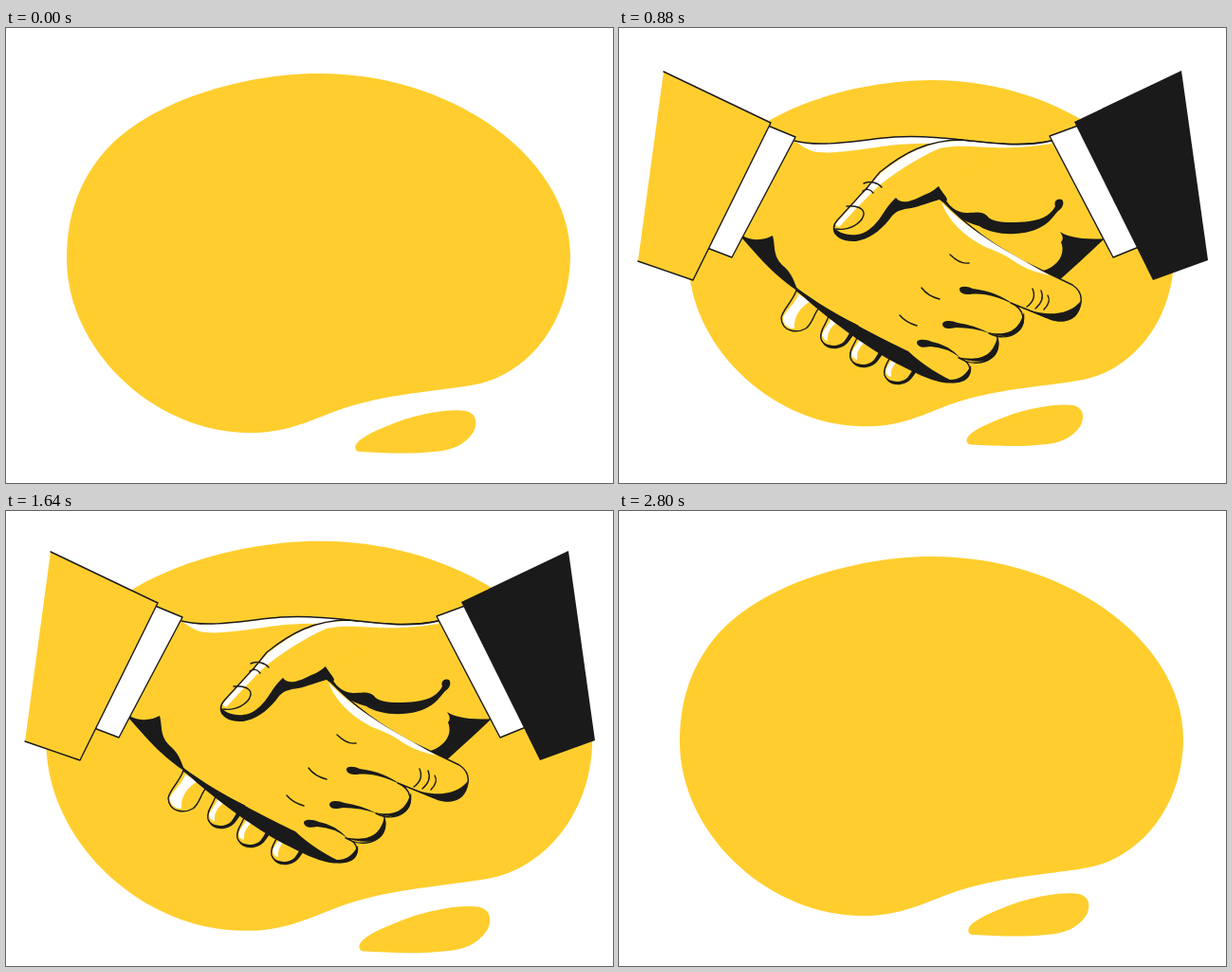
Recreate the animation shown at these times as an HTML page. Size 640x480 px, loop 2.88 s.

```html
<!DOCTYPE html>
<html lang="en">
<head>
<meta charset="utf-8">
<title>Handshake</title>
<style>
html, body { margin: 0; width: 100%; height: 100%; overflow: hidden; background: #fff; }
svg { display: block; width: 640px; height: 480px; }
.y { fill: #ffce2e; }
.k { fill: #1a1a1a; }
.w { fill: #fff; }
.l { fill: none; }
.l, .o { stroke: #1a1a1a; stroke-width: 1.4; stroke-linecap: round; stroke-linejoin: round; }
</style>
</head>
<body>
<svg viewBox="0 0 640 480">
  <defs>
    <path id="knuckles" class="l" d="M298 249C304 246 306 242 304 236M306 252C312 249 314 243 312 237M314 255C320 252 321 247 320 241"/>
    <g id="tip">
      <path class="k" d="M222 300C220 312 211 318 213 329C217 341 234 341 242 331C247 325 248 320 255 316Z"/>
      <path class="y o" d="M222 300C220 312 211 318 213 328C216 337 231 338 238 331C244 324 244 317 252 314Z"/>
      <path class="w" d="M224 303L233 308C224 314 219 321 220 330C215 329 213 324 215 321C219 314 223 311 224 303Z"/>
    </g>
  </defs>

  <g id="blob" class="y">
    <path d="M64 243C64 200 76 165 100 135C147 77 250 48 330 48C475 48 595 140 595 240C595 310 550 368 490 377C440 385 390 387 340 407C310 419 290 427 257 427C157 427 64 340 64 243Z"/>
    <path d="M369 445C364 435 390 424 420 413C450 404 472 402 485 404C497 407 497 418 493 426C484 440 470 446 450 447C425 450 395 448 373 447Q370 447 369 445Z"/>
  </g>

  <!-- right hand, behind the left one -->
  <g class="right">
    <g class="open" transform="translate(-74 33)">
      <path class="y o" d="M270 247L335 203L380 225L378 270L330 300Z"/>
      <path class="l" d="M314 273L363 238M318 279L366 246"/>
      <path class="k" d="M309 232C313 242 318 248 329 256L304 250Q310 246 309 232Z"/>
      <path class="w" d="M280 243L309 224L306 230L286 246ZM320 280L356 255L352 261L326 284Z"/>
      <path class="y" d="M355 99C385 89 410 84 440 86C470 88 500 97 528 90L584 191L516 249L430 290L380 262L333 204L410 137L350 130Z"/>
      <path class="l" d="M350 101C380 90 410 84 440 86C470 88 500 97 528 91"/>
      <path class="w" d="M524 97C500 99 470 89 440 87C410 85 375 94 350 103L352 110C385 97 410 92 440 94C475 101 500 104 524 97Z"/>
      <path class="k" d="M411 135L333 204C338 228 366 242 379 266L284 352C280 366 288 370 302 369C335 357 380 320 410 294C400 320 375 350 350 380C375 386 395 372 415 346L431 328C460 300 500 266 518 249L585 191C565 193 550 190 541 186C540 197 550 202 546 210C536 224 510 224 484 230C467 232 464 238 469 244C480 256 485 266 472 276C450 286 425 284 412 276C402 268 406 255 411 249C420 238 425 228 419 227C400 240 375 240 356 229C340 216 340 205 351 199C370 190 386 186 391 174C393 163 402 158 412 154Z"/>
      <path class="y o" d="M378 264C392 270 396 285 386 298C376 305 366 304 362 298C368 318 350 328 330 333C332 345 310 358 296 364C285 367 279 362 284 352C310 325 350 291 378 264Z"/>
      <path class="w" d="M284 353L293 348C290 355 291 360 294 363C286 365 281 360 284 353Z"/>
      <path class="y o" d="M408 294C418 300 424 308 423 317C417 327 408 331 399 325C406 334 400 343 392 346C386 347 384 344 381 340C386 355 372 370 360 380C350 383 345 376 346 366C365 342 385 318 408 294Z"/>
      <path class="l" d="M392 168C394 194 410 208 439 213"/>
      <path class="k" d="M411 134C417 150 427 160 440 163C450 165 457 162 463 170C470 177 505 177 520 172C532 168 537 160 534 154C535 148 542 148 543 152C543 158 540 162 536 166C528 182 515 190 495 190C475 190 465 180 450 178C432 172 418 162 408 146Z"/>
    </g>
    <g class="closed">
      <path class="y" d="M362 118C400 124 430 124 456 119L511 222L462 267L350 200L300 150Z"/>
      <path class="l" d="M350 117C400 124 430 124 456 119"/>
      <path class="k" d="M512 222C495 238 480 252 462 268L443 257C460 254 472 240 466 226Q470 222 465 215C472 220 490 224 512 222Z"/>
      <path class="y o" d="M187 277C182 290 172 298 171 306C172 321 188 322 197 317C205 311 205 301 212 294Z"/>
      <path class="w" d="M189 281L202 288C191 295 184 304 185 317C177 317 172 311 173 305C178 295 186 291 189 281Z"/>
      <use href="#tip"/>
      <use href="#tip" transform="translate(31 20)"/>
      <use href="#tip" transform="translate(67 38)"/>
      <path class="k" d="M340 172C347 190 357 195 368 195C378 195 382 193 388 198C392 206 415 206 432 204C448 202 456 196 460 188C458 182 463 179 467 181C470 184 468 190 463 193C457 200 452 207 443 211C425 220 395 219 380 209C362 204 348 195 340 182Z"/>
    </g>
  </g>

  <g id="left">
    <g class="open" transform="translate(132 40)">
      <path class="y" d="M54 79C80 86 110 83 140 77C185 71 225 72 250 83C270 95 275 99 286 102C296 106 306 104 311 112C316 122 312 135 300 140C285 143 258 136 240 126L191 127C215 150 240 168 270 188L370 250C380 257 381 270 374 275Q372 278 366 279C378 282 386 287 383 297Q380 307 358 308Q355 313 353 322Q350 333 325 334C322 350 310 354 245 342L215 334L62 246L-2 180Z"/>
      <path class="l" d="M300 140C285 143 258 136 240 126L191 127C215 150 240 168 270 188L370 250C380 257 381 270 374 275C368 279 360 278 350 275L290 254C262 245 250 240 230 237M300 140C312 135 316 122 311 112C306 104 296 106 286 102C270 95 262 86 250 83"/>
      <path class="w" d="M235 78Q252 83 263 92C278 99 295 106 308 109Q306 114 299 114C285 107 270 102 258 97Q245 87 232 83Z"/>
      <path class="l" d="M275 112C272 118 285 121 296 120C306 119 311 114 309 110M275 112C280 105 293 106 303 108M247 96C249 90 255 88 263 88M257 98C258 92 264 91 272 93"/>
      <path class="k" d="M227 237C227 233 235 232 243 236Q254 238 264 245Q251 240 239 240C231 242 227 240 227 237ZM209 268C209 264 217 264 225 267L246 274L222 271C214 273 209 271 209 268ZM181 293C181 288 190 289 197 292Q208 293 216 299Q206 295 195 296C186 298 182 296 181 293Z"/>
      <path class="k" d="M379 262C382 276 370 283 352 276C366 277 375 274 379 262ZM384 288C387 310 372 312 352 306C370 306 377 304 384 288ZM352 313C359 332 342 338 322 333C341 332 348 328 352 313ZM322 336C326 352 306 356 282 350C306 350 317 348 322 336Z"/>
      <path class="l" d="M220 268C255 272 300 290 358 306M366 279C378 282 386 287 383 297C380 307 368 308 358 306M192 293C225 298 270 320 325 333M350 308C356 314 353 328 345 332Q338 335 325 333M318 333C325 338 322 348 312 351C298 353 270 348 225 336"/>
      <path class="l" d="M356 273C357 262 361 256 370 256C378 262 373 274 360 276M367 303C366 292 370 286 380 286M342 329C340 318 345 312 351 312M304 349C303 340 308 335 318 335"/>
      <path class="l" d="M335 262C339 258 341 254 342 247M331 299Q335 293 333 287M307 322Q311 315 309 308M281 349Q285 343 283 336"/>
      <use href="#knuckles" y="2"/>
      <use href="#knuckles" x="-21" y="32"/>
      <use href="#knuckles" x="-41" y="61"/>
      <use href="#knuckles" x="-68" y="85"/>
      <path class="k" d="M50 232C100 266 160 305 215 331L236 342C180 334 110 290 50 236Z"/>
      <path class="l" d="M54 79C80 86 110 83 140 77C185 71 225 72 250 83"/>
      <path class="w" d="M54 80C80 87 110 84 140 78C185 72 225 73 248 83L240 88C220 80 200 78 180 79C150 80 120 90 90 91C75 91 64 86 54 80Z"/>
    </g>
    <g class="closed">
      <path class="y" d="M185 118C215 127 260 117 290 115C320 113 345 116 362 118L340 181C365 207 395 230 430 248L478 271C487 277 489 285 486 294C483 305 470 309 450 305L413 290C428 296 430 312 420 320L398 324C403 335 398 348 385 352L360 349C372 352 374 365 362 371C350 378 320 368 302 342L188 277L130 220Z"/>
      <path class="w" d="M185 119C215 127 260 117 290 115C320 113 345 116 362 118L330 122C280 120 245 134 210 131C200 130 192 124 185 119Z"/>
      <path class="l" d="M185 119C215 127 260 117 290 115C320 113 345 116 362 118"/>
      <path class="k" d="M186 273C220 299 270 324 305 341C320 355 340 368 356 374C340 377 320 369 280 347C255 332 215 303 186 276Z"/>
      <path class="k" d="M425 295C445 303 472 306 487 288C487 308 470 313 455 308ZM427 300C430 322 414 331 388 321C410 325 421 320 427 300ZM399 326C405 350 386 358 356 347C382 352 394 346 399 326ZM371 356C374 376 350 380 330 366C352 376 364 370 371 356Z"/>
      <path class="k" d="M359 275C360 272 367 272 373 275C390 277 405 283 415 291C400 284 385 279 370 281C362 281 359 279 359 275ZM341 313C341 308 350 308 357 311Q373 313 391 322Q374 316 355 316C346 318 342 317 341 313ZM314 332C314 328 323 328 330 331Q347 334 360 348Q346 337 328 336C319 338 315 336 314 332Z"/>
      <path class="l" d="M340 181C365 207 395 230 430 248L478 271C487 277 489 285 486 294C483 305 470 309 450 305L413 290C428 296 430 312 420 320C412 328 400 327 390 322M398 324C403 335 398 348 385 352C375 355 365 352 358 348C372 352 374 365 362 371C350 378 330 368 315 358"/>
      <path class="l" d="M430 294C437 289 439 282 436 275M439 296C446 290 448 284 445 277M448 297C453 292 455 287 452 282"/>
    </g>
    <path class="w" d="M340 184C357 202 385 222 417 240L454 261C432 256 424 251 415 245C400 234 390 235 374 224C356 212 346 199 340 184Z"/>
    <path class="k" d="M130 219C142 226 155 223 162 219C165 230 162 240 172 250C182 258 184 266 189 278C165 262 150 245 130 222Z"/>
    <path class="l" d="M349 239C356 246 362 249 369 248M319 274C324 281 330 284 338 286M296 303C301 309 307 312 314 314"/>
    <path class="w o" d="M157 103L186 115L119 242L93 232Z"/>
    <path class="y" d="M47 46L160 100L78 266L20 246Z"/>
    <path class="l" d="M47 46L160 100L78 266L20 246"/>
  </g>

  <!-- right thumb and sleeve, in front -->
  <g class="right">
    <g class="open" transform="translate(-74 33)">
      <path class="y" d="M360 97C335 106 310 122 298 130C288 138 290 150 305 154C330 157 345 146 364 133Z"/>
      <path class="w" d="M356 99C335 106 315 119 300 130L304 133C320 126 345 111 358 107Z"/>
      <path class="k" d="M291 137C292 146 304 150 320 150C342 148 350 136 366 130C373 137 390 140 402 136L412 133L415 141C395 141 380 144 366 140C350 145 342 160 318 159C300 158 289 150 291 137Z"/>
      <path class="l" d="M360 97C335 106 310 122 298 130C291 134 290 143 293 146M298 133C305 122 325 121 327 128C329 137 312 143 300 141M333 108C338 107 341 110 342 115M341 102C350 101 354 104 355 109"/>
    </g>
    <g class="closed">
      <path class="y" d="M362 118C330 118 300 132 275 152L230 203C222 212 228 222 245 222C270 222 280 195 292 184L340 178L380 140Z"/>
      <path class="w" d="M456 119C425 126 400 122 362 119C325 118 300 134 276 153L228 207L232 210L246 195L268 172C280 160 312 138 338 127C370 120 395 132 456 122Z"/>
      <path class="y" d="M258 193Q257 205 234 211L247 196Z"/>
      <path class="k" d="M226 209C230 217 246 221 258 216C275 208 279 190 292 179C298 188 312 181 322 176C331 173 335 168 337 167C341 174 345 177 346 181C345 185 341 184 338 181C326 184 318 188 308 190C300 191 294 192 288 198C278 212 266 222 250 225C234 226 225 219 226 209Z"/>
      <path class="l" d="M456 119C425 126 400 122 362 118C325 118 300 132 275 152C270 158 267 162 262 168L230 203Q224 210 228 217M240 188C250 187 259 190 258 197C256 206 243 214 229 212M258 164C265 161 273 163 277 168M257 172C261 169 265 170 268 174"/>
    </g>
    <path class="w o" d="M454 114L484 103L548 231L521 242Z"/>
    <path class="k" d="M593 45L480 99L563 266L621 245Z"/>
  </g>
</svg>
<script>
const LOOP = 2880, STEP = 40;
const PULSE = [[160, .992], [480, .973], [800, .955], [880, .964], [1360, 1.046],
  [1600, 1.087], [1800, 1.075], [1960, 1.059], [2440, 1.026], [2800, 1]];
const $$ = s => [...document.querySelectorAll(s)];
const blob = $$('#blob'), left = $$('#left'), right = $$('.right');
const open = $$('.open'), closed = $$('.closed');

const clamp = v => Math.min(1, Math.max(0, v));
const place = (els, value) => els.forEach(e => e.setAttribute('transform', value));
const show = (els, on) => els.forEach(e => e.style.display = on ? '' : 'none');

function pulse(t) {
  if (t < 160) return 1;
  for (let i = 1; i < PULSE.length; i++) {
    const [a, v] = PULSE[i - 1], [b, w] = PULSE[i];
    if (t <= b) return v + (w - v) * (t - a) / (b - a);
  }
  return 1;
}

// Distance from the clasp: decelerating in, accelerating out.
function away(t, dist, pIn, pOut) {
  return dist * (t < 1400
    ? Math.pow(1 - clamp((t - 160) / 560), pIn)
    : Math.pow(clamp((t - 2200) / 560), pOut));
}

function draw(t) {
  place(blob, `translate(320 240) scale(${pulse(t)}) translate(-320 -240)`);
  const seen = t > 160 && t < 2760;
  show(left, seen);
  show(right, seen);
  const clasp = t >= 600 && t <= 2320;
  show(open, !clasp);
  show(closed, clasp);
  const shake = t > 880 && t < 2080 ? 6 * Math.sin((t - 880) / 480 * 2 * Math.PI) : 0;
  const l = away(t, 560, 1.7, 1.67), r = away(t, 440, 2.1, 1.51);
  place(left, `translate(${-l} ${shake - l * .305})`);
  place(right, `translate(${r} ${shake - r * .455})`);
}

// The open hands are drawn where they first meet; shift them to the clasp.
place($$('#left .open'), 'translate(132 40)');
place($$('.right .open'), 'translate(-74 33)');

const start = performance.now();
function tick() {
  const t = (performance.now() - start) % LOOP;
  draw(Math.floor(t / STEP) * STEP);
  requestAnimationFrame(tick);
}
tick();
</script>
</body>
</html>
```
